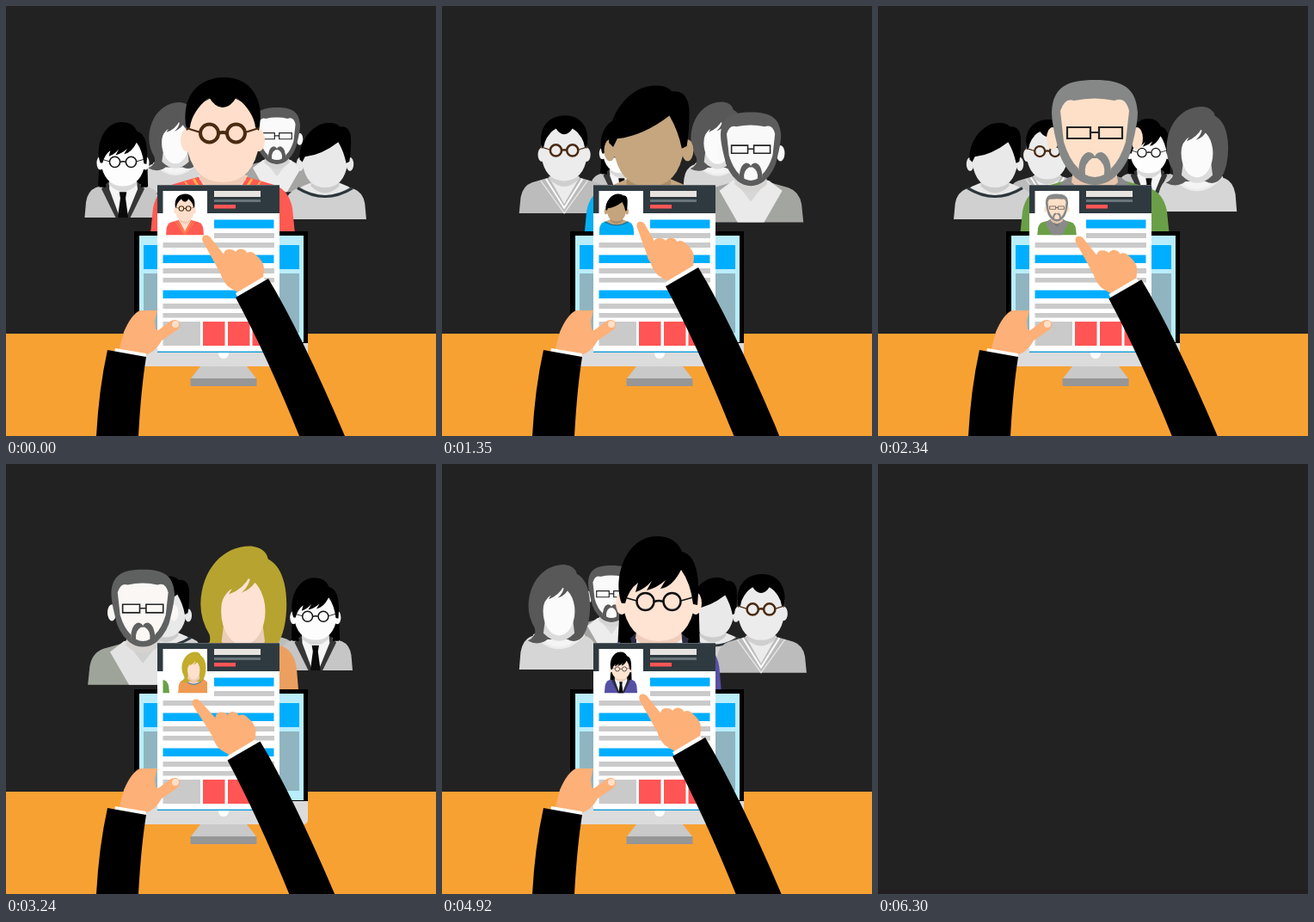
Recreate the animation shown at these times as an HTML page with a canvas. Size 500 by 500 pixels, loop 6.33 s.

```html
<!DOCTYPE html>
<html>
<head>
<meta charset="utf-8">
<style>
html, body { margin: 0; width: 100%; height: 100%; overflow: hidden; background: #222; }
canvas { display: block; width: 100%; height: 100%; }
</style>
</head>
<body>
<canvas id="stage" width="500" height="500"></canvas>
<script>
const ctx = document.getElementById('stage').getContext('2d');
const LOOP = 6330, CYCLE = 1260, SLIDE = 900, STEP = 30;
let gray = 0; // 0 = full colour, 1 = faded

const lerp = (a, b, f) => a + (b - a) * f;
const smooth = f => f * f * (3 - 2 * f);
const channel = (hex, i) => parseInt(hex.slice(1 + 2 * i, 3 + 2 * i), 16);
function tone(c, g = c) {
  return `rgb(${[0, 1, 2].map(i => Math.round(lerp(channel(c, i), channel(g, i), gray)))})`;
}
function fill(d, c, g) {
  ctx.fillStyle = tone(c, g);
  ctx.fill(new Path2D(d));
}
function line(d, w, c, g) {
  ctx.strokeStyle = tone(c, g);
  ctx.lineWidth = w;
  ctx.stroke(new Path2D(d));
}
function rect(x, y, w, h, c) {
  ctx.fillStyle = c;
  ctx.fillRect(x, y, w, h);
}
function oval(x, y, rx, ry, c, g) {
  ctx.fillStyle = tone(c, g);
  ctx.beginPath();
  ctx.ellipse(x, y, rx, ry, 0, 0, 7);
  ctx.fill();
}

// Shared parts of a figure: x is measured from the middle, y from the top of the hair.
function body(half, c, g) {
  ctx.save();
  ctx.scale(half / 84, 1);
  fill('M-26 115L-60 125Q-77 131 -81 152L-84 182L84 182L81 152Q77 131 60 125L26 115Z', c, g);
  ctx.restore();
}
function neck(c, g) {
  fill('M-24 95L24 95L27 119Q0 146 -27 119Z', c, g);
}
function face(c, g) {
  fill('M-43 48L-43 75Q-36 122 0 122Q36 122 43 75L43 48Q0 -5 -43 48Z', c, g);
}
function ears(x, y, c, g) {
  oval(-x, y, 7, 13, c, g);
  oval(x, y, 7, 13, c, g);
}
function roundGlasses(y, r, w, c, g) {
  ctx.strokeStyle = tone(c, g);
  ctx.lineWidth = w;
  for (const x of [-15.5, 15.5]) {
    ctx.beginPath();
    ctx.arc(x, y, r, 0, 7);
    ctx.stroke();
  }
  line(`M-5 ${y}Q0 ${y - 2} 5 ${y}`, w, c, g);
}

function redShirtMan() {
  const skin = ['#ffdfcb', '#ececec'];
  body(84, '#ff5a52', '#bcbcbc');
  fill('M-29 114L0 165L29 114Z', ...skin);
  line('M-34 118L0 172L34 118', 3, '#ffb24d', '#ffffff');
  line('M-44 121L0 182L44 121', 2, '#ffb24d', '#e9e9e9');
  neck('#edcbb6', '#cfcfcf');
  ears(42, 73, ...skin);
  face(...skin);
  fill('M-42 62C-50 18 -25 0 2 0C32 0 50 25 42 62L38 58Q36 40 16 23Q9 35 0 35Q-9 35 -16 23Q-36 40 -38 58Z', '#000000');
  line('M-26 64L-42 59M26 64L42 59', 2, '#4a2a10');
  roundGlasses(65, 10.5, 4, '#4a2a10');
}

function blueShirtMan() {
  const skin = ['#c4a47c', '#e9e9e9'];
  body(78, '#00adf5', '#d0d0d0');
  fill('M-46 121Q0 158 46 121L20 110L-20 110Z', ...skin);
  line('M-52 123Q0 155 52 123', 5, '#23708f', '#2c363b');
  neck('#a98b66', '#cccccc');
  ears(47, 78, ...skin);
  face(...skin);
  fill('M-48 69C-50 35 -24 2 4 0C17 -1 24 2 28 7C44 5 49 18 49 32Q49 56 46 73L40 76Q36 55 25 36Q-6 60 -38 64L-43 74Z', '#000000');
}

function greenJacketMan() {
  const skin = ['#fee0c8', '#fafafa'], hair = ['#868887', '#5b5b5b'];
  body(87, '#6a9f47', '#a5a5a4');
  fill('M-30 113L-52 130L-22 182L22 182L52 130L30 113Z', '#8a8a8a', '#ededed');
  fill('M-28 112L0 148L28 112Z', '#75797a', '#dadada');
  neck('#e7c4ac', '#d4d4d4');
  ears(49, 68, ...skin);
  fill('M-44 74Q-50 50 -50 38C-49 8 -32 0 0 0C34 0 48 10 50 38Q50 50 44 74Q40 98 22 114Q12 122 0 122Q-12 122 -22 114Q-40 98 -44 74Z', ...hair);
  fill('M-36 72L-40 36Q-35 20 -24 24Q0 19 23 24Q36 19 40 36L36 72Q30 92 19 103L18 114Q0 117 -18 114L-19 103Q-30 92 -36 72Z', ...skin);
  fill('M-19 114Q-20 88 -8 84Q-2 84 0 89Q2 84 8 84Q20 88 19 114Q12 120 0 121Q-12 120 -19 114Z', ...hair);
  fill('M-11 110Q-13 97 -3 91L3 91Q13 97 11 110Q0 116 -11 110Z', ...skin);
  line('M-32 55H-5V68H-32ZM5 55H32V68H5ZM-5 61H5', 2.2, '#242424');
}

function blondeWoman() {
  const skin = ['#fee0cf', '#fbfbfb'], hair = ['#c2ac2b', '#585858'];
  body(69, '#ef9a52', '#d6d6d6');
  fill('M-40 118Q0 172 40 118Z', '#f3cdb9', '#f4f4f4');
  line('M-44 121Q0 168 44 121', 4, '#4a87a8', '#ededed');
  fill('M-53 72C-52 28 -24 -1 10 0Q28 2 31 16C48 25 54 48 54 72Q54 104 42 124Q30 138 15 130L-20 130Q-35 142 -54 132Q-38 124 -42 110Q-53 92 -53 72Z', ...hair);
  neck('#edcbb6', '#dcdcdc');
  oval(0, 81, 27.5, 42, ...skin);
  fill('M-30 82Q-26 60 -14 53L-18 60Q0 54 9 36Q9 48 -2 58Q14 52 18 38Q28 50 29 78L36 50L10 24L-27 40Z', ...hair);
}

function purpleSuitWoman() {
  const skin = ['#ffe3d3', '#fdfdfd'];
  fill('M-44 60L-48 132L48 132L46 60Z', '#000000');
  body(73, '#5650a5', '#c6c6c6');
  fill('M-27 113L-41 127L-14 182L14 182L41 127L27 113Z', '#2b2b40', '#363636');
  fill('M-26 112L-26 128L-6 182L6 182L28 128L26 112Z', '#f1f1f4', '#f6f6f6');
  fill('M-7 133L7 133L5 145L10 182L-10 182L-5 145Z', '#0a0a0a');
  neck('#efccb9', '#d9d9d9');
  fill('M-44 70L-45 124L-32 124L-38 78ZM43 70L46 124L34 124L38 78Z', '#000000');
  ears(43, 78, ...skin);
  face(...skin);
  fill('M-43 78C-54 48 -38 0 -2 0Q20 0 27 18C46 22 48 54 45 80L40 79Q37 54 26 39Q16 59 2 61L8 51Q-2 60 -14 63L-8 52Q-17 62 -27 65L-24 54Q-35 62 -39 78Z', '#000000');
  line('M-26 75L-40 71M26 75L40 71', 1.5, '#111111');
  roundGlasses(76, 10, 2.5, '#111111');
}

// top and size at the centre, front side and back side of the ring
const people = [
  { draw: redShirtMan, top: [83, 128, 132], size: [1, .63, .57] },
  { draw: blueShirtMan, top: [84, 136, 132], size: [1, .615, .57] },
  { draw: greenJacketMan, top: [86, 124, 118], size: [1, .67, .54] },
  { draw: blondeWoman, top: [83, 117, 112], size: [1, .67, .58] },
  { draw: purpleSuitWoman, top: [84, 135, 131], size: [1, .61, .52] }
];
const slotX = [252, 371, 315, 197, 136];
const slotLevel = [0, 1, 2, 2, 1];
const segmentBow = [9, -3, 0, -3, 10];

function drawPerson(p, x, y, s, fade) {
  ctx.save();
  ctx.translate(x, y);
  ctx.scale(s, s);
  gray = fade;
  p.draw();
  gray = 0;
  ctx.restore();
}

function drawRing(turn) {
  people.map((p, i) => {
    const u = (i - turn + 10) % 5, a = Math.floor(u), b = (a + 1) % 5, f = u - a;
    const la = slotLevel[a], lb = slotLevel[b];
    return {
      p, x: lerp(slotX[a], slotX[b], f),
      y: lerp(p.top[la], p.top[lb], f) + segmentBow[a] * 4 * f * (1 - f),
      s: lerp(p.size[la], p.size[lb], f),
      depth: lerp(la, lb, f),
      fade: smooth(Math.min(1, u, 5 - u))
    };
  }).sort((m, n) => n.depth - m.depth)
    .forEach(o => drawPerson(o.p, o.x, o.y, o.s, o.fade));
}

function drawMonitor() {
  rect(149, 262, 202, 130, '#000');
  rect(155, 267, 191, 124, '#b9edfb');
  rect(160, 278, 181, 28, '#00aeff');
  rect(160, 311, 181, 69, '#90b5c0');
  rect(346, 386, 5, 6, '#000');
  fill('M149 392H351V413Q351 419 345 419H155Q149 419 149 413Z', '#dcdcdc');
  oval(253, 404, 6, 6, '#ffffff');
  fill('M226 419H280L291 433H215Z', '#c9c9c9');
  rect(214.5, 433, 77, 9, '#969696');
}

function drawPage(turn) {
  const blue = '#00aeff', pale = '#cacaca', red = '#ff5555';
  rect(176, 208, 142, 195, '#fff');
  rect(176, 208, 142, 33, '#2f3a40');
  rect(176, 208, 142, 1, '#5c6468');
  rect(182.5, 215, 51.5, 53, '#fff');
  rect(242, 215, 54, 7, '#e7e3df');
  rect(242, 225, 54, 3, '#69757a');
  rect(242, 231, 25, 4.5, red);
  rect(242, 248.5, 69.5, 10, blue);
  rect(242, 264, 70, 6, pale);
  rect(182.5, 275, 129.5, 6, pale);
  for (const y of [289.5, 330.5]) {
    rect(182.5, y, 129, 9.5, blue);
    rect(182.5, y + 15.5, 129.5, 6, pale);
    rect(182.5, y + 26.5, 129.5, 5.5, pale);
  }
  rect(182.5, 367, 43.5, 28, pale);
  for (const x of [229, 258, 286.5]) rect(x, 367, 25.5, 28, red);
  rect(312, 367, 6, 28, '#fff');
  rect(176, 401.5, 142, 1.5, '#1d9ed8');

  ctx.save();
  ctx.beginPath();
  ctx.rect(182.5, 215, 51.5, 52);
  ctx.clip();
  const k = Math.floor(turn), f = turn - k;
  for (const n of [0, 1]) {
    drawPerson(people[(k + n) % 5], 208 + 51 * (n - f), 218.5, .262, 0);
  }
  ctx.restore();
}

const skinTone = '#fdb077';

function drawLeftHand() {
  fill('M131 402L137 379Q146 358 156 354L176 354L173 366L174 376L177 377L192 366Q200 363 202.5 370Q202 375 197 378L181 389Q174 402 162 406Z', skinTone);
  oval(197, 370, 4, 4, '#ffe0cb');
  fill('M127 398L163 404L162 409L126 403Z', '#ffffff');
  fill('M118 400L163 408Q157 445 154 500L105 500Q108 445 118 400Z', '#000000');
}

// Path of the pointing hand through one swipe
const keyT = [0, 90, 150, 300, 450, 600, 720, 900, 1080, 1260];
const keyX = [0, -7, -17, -28, -28, -19, -9.5, 0, 1.3, 0];
const keyY = [0, -13, -16, -13, -3, 5, 5.5, 0, 1.3, 0];
const keyTilt = [0, 9, 14, 13, 4, -4, -4, 0, 0, 0];

function spline(keys, t) {
  const last = keyT.length - 1;
  let i = 0;
  while (i < last - 1 && t >= keyT[i + 1]) i++;
  const slope = n => {
    const a = Math.max(0, n - 1), b = Math.min(last, n + 1);
    return (keys[b] - keys[a]) / (keyT[b] - keyT[a]);
  };
  const h = keyT[i + 1] - keyT[i], u = (t - keyT[i]) / h, v = 1 - u;
  return lerp(keys[i], keys[i + 1], smooth(u)) + h * u * v * (v * slope(i) - u * slope(i + 1));
}

function drawRightHand(t) {
  ctx.save();
  ctx.translate(spline(keyX, t), spline(keyY, t));
  ctx.save();
  ctx.translate(253, 303);
  ctx.rotate(spline(keyTilt, t) * Math.PI / 180);
  ctx.translate(-253, -303);
  fill('M228.5 273Q227 267 232 266.5Q236 266 239 271L255 291Q266 303 257 313Q249 314 245 303Z', skinTone);
  ctx.restore();
  fill('M247 300L253 289Q254 282 260 283Q265 283 267 286Q271 280 278 284Q280 286 280 287Q286 284 291 290Q299 296 300 305L299 317L271 334L258 326Q249 317 247 300Z', skinTone);
  fill('M267 334L299 315L302 319L269 338Z', '#ffffff');
  fill('M267 339L305 317Q343 380 394 500L412 545L360 545L341 500Q304 408 267 339Z', '#000000');
  ctx.restore();
}

function render(t) {
  rect(0, 0, 500, 500, '#222');
  if (t >= 5 * CYCLE) {
    rect(0, 495, 500, 5, '#231f20');
    return;
  }
  const round = Math.floor(t / CYCLE), phase = t % CYCLE;
  const turn = round + Math.min(1, phase / SLIDE);
  drawRing(turn);
  rect(0, 381, 500, 119, '#f8a133');
  drawMonitor();
  drawPage(turn);
  drawLeftHand();
  drawRightHand(round === 4 ? Math.min(phase, SLIDE) : phase);
}

const start = performance.now();
function tick() {
  const t = (performance.now() - start) % LOOP;
  render(Math.floor(t / STEP) * STEP);
  requestAnimationFrame(tick);
}
tick();
</script>
</body>
</html>
```
